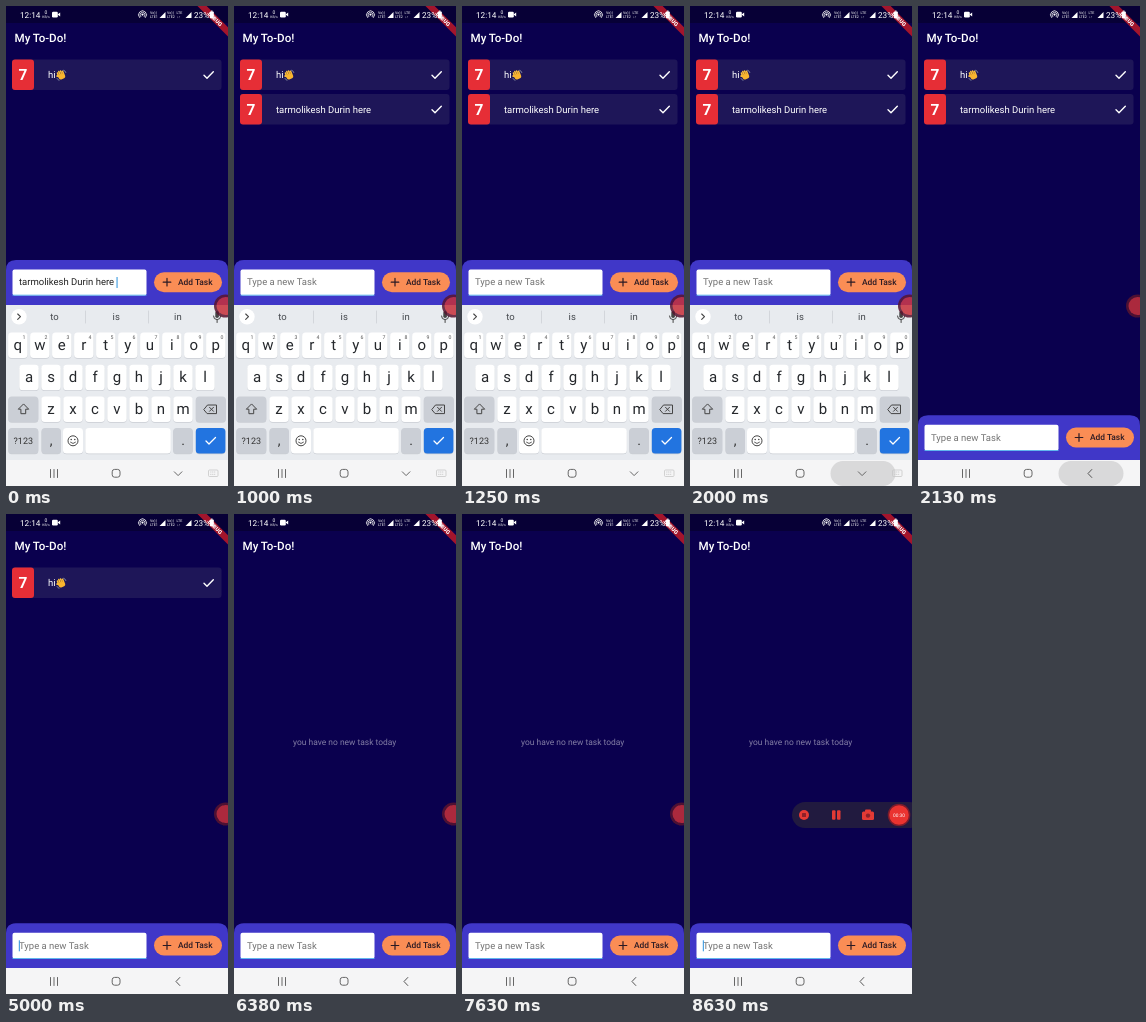
An HTML page for the animation above (8760 ms loop, 222 by 480 pixels).

```html
<!DOCTYPE html>
<html lang="en">
<head>
<meta charset="utf-8">
<title>To-do app</title>
<style>
html, body { margin: 0; width: 100%; height: 100%; overflow: hidden; background: #0a004e; }
svg { display: block; width: 222px; height: 480px; font-family: Roboto, sans-serif; text-rendering: geometricPrecision; }
.line { fill: none; stroke-linecap: round; stroke-linejoin: round; }
.mid { text-anchor: middle; }
</style>
</head>
<body>
<svg id="stage" viewBox="0 0 222 480"></svg>
<script>
const LOOP = 8760, STEP = 125;
const NEW_TASK = 'tarmolikesh Durin here';

const rect = (x, y, w, h, fill, r = 0, extra = '') =>
  `<rect x="${x}" y="${y}" width="${w}" height="${h}" rx="${r}" fill="${fill}" ${extra}/>`;
const circle = (x, y, r, fill, extra = '') =>
  `<circle cx="${x}" cy="${y}" r="${r}" fill="${fill}" ${extra}/>`;
const text = (x, y, size, fill, str, extra = '') =>
  `<text x="${x}" y="${y}" font-size="${size}" fill="${fill}" ${extra}>${str}</text>`;
const line = (d, color, width = 1, extra = '') =>
  `<path class="line" d="${d}" stroke="${color}" stroke-width="${width}" ${extra}/>`;
const group = (id, body, extra = '') => `<g id="${id}" ${extra}>${body}</g>`;
const MID = 'class="mid"', BOLD = 'font-weight="500"';

const wave = `<g transform="translate(55.3 69) rotate(-22)">
  ${line('M-2.8 -.5V-3.2M-1 -1V-4.2M.8 -1V-4M2.5 0V-3M-2.5 1L-4.4 -.6', '#ffc33c', 1.6)}
  ${rect(-3.5, -1.5, 6.8, 5.7, '#f9b52f', 2.5)}
  ${line('M-1.9 -1V-2.4M0 -1.2V-3M1.7 -1V-2.4', '#b8741c', .4)}</g>
  ${line('M57.5 64.2q2 .4 2.4 2.4M51 72.5q.6 1.4 2 1.8', '#9aa5b5', .7)}`;

const task = (id, y, label, extra = '') => group(id,
  rect(6, 53.5, 209.5, 30.5, '#1e1658', 3) + rect(6, 53.5, 22, 30.5, '#e62e36', 3) +
  text(17, 74.4, 15.5, '#fff', '7', MID + ' font-weight="700"') +
  text(42, 72.2, 9.5, '#fff', label) + extra +
  circle(202.5, 69, 0, '#fff', `id="${id}Tap" opacity=".2"`) +
  line('M198 69.2l3 3 6.3-6.4', '#fff', 1.4, 'stroke-linecap="butt"'),
  `transform="translate(0 ${y})"`);

const signal = x => `<path d="M${x} 12h6v-6z" fill="#fff"/>`;
const statusBar = rect(0, 0, 222, 17, '#070036') +
  `<g transform="translate(222 0) rotate(45)">${rect(-22, 15.1, 44, 6.5, '#a3152c')}
   ${text(0, 20.3, 5.5, '#fff', 'DEBUG', MID + ' font-weight="900"')}</g>` +
  text(14, 11.8, 8.2, '#fff', '12:14') +
  text(40, 8.4, 5, '#fff', '0', MID) + text(40, 12, 3.4, '#fff', 'KB/s', MID) +
  rect(46, 5.8, 5.8, 5.6, '#fff', 1.2) + '<path d="M51.5 8.5l2.7-2v4z" fill="#fff"/>' +
  circle(136.5, 8.6, 1.1, '#fff') +
  line('M134.7 10.6a2.5 2.5 0 1 1 3.6 0M133.6 11.6a4 4 0 1 1 5.8 0', '#fff', .8) +
  ['LTE1', 'LTE2'].map((s, i) => text(144 + 17 * i, 8, 3.7, '#fff', 'Vo))') +
    text(144 + 17 * i, 11.8, 3.7, '#fff', s)).join('') +
  signal(153.5) + text(170.5, 8, 3.7, '#fff', 'LTE') + text(171, 11.8, 3.7, '#fff', '↓↑') + signal(179.5) +
  text(188, 11.8, 8.2, '#fff', '23%') + rect(203.8, 5.5, 4, 6.8, '#fff', .8) + rect(205, 4.6, 1.6, 1, '#fff');

const panel = group('panel',
  '<path d="M0 45V10Q0 0 10 0H212Q222 0 222 10V45z" fill="#4037c8"/>' +
  rect(6.5, 9.5, 134, 26, '#fff', 2) + rect(6.5, 34.7, 134, .9, '#55b4ef') +
  text(13, 25.4, 9.5, '#222', NEW_TASK, 'id="typed"') +
  text(13, 25.4, 9.5, '#747474', 'Type a new Task', 'id="hint"') +
  rect(0, 17, 1.1, 11, '#3d9be0', 0, 'id="cursor"') +
  rect(148, 12.2, 68, 20, '#fa8d55', 10) +
  `<clipPath id="pill">${rect(148, 12.2, 68, 20, '#000', 10)}</clipPath>` +
  circle(182, 22.2, 0, '#fff', 'id="addTap" clip-path="url(#pill)"') +
  line('M157.2 22.2h7.6M161 18.4v7.6', '#2a1a24', 1.2) +
  text(172, 25.2, 8.4, '#2a1a24', 'Add Task', BOLD));

const key = (x, y, w, fill, label = '', color = '#25282c', size = 15) =>
  rect(x, y + .8, w, 25.5, '#c9cdd3', 3.5) + rect(x, y, w, 25.5, fill, 3.5) +
  text(x + w / 2, y + 12.5 + size * .34, size, color, label, MID);
const letters = (str, x, y) =>
  [...str].map((c, i) => key(x + 22 * i - 9.7, y, 19.4, '#fff', c)).join('');
const GREY = '#cbcfd6';
const keyboard = group('keyboard',
  rect(0, 299, 222, 155, '#e8ebef') + circle(13, 310.7, 7.7, '#fff') +
  line('M11.7 308l2.8 2.7-2.8 2.7', '#444', 1.1) +
  ['to', 'is', 'in'].map((s, i) => text(48.5 + 61.7 * i, 314, 9.5, '#44484d', s, MID)).join('') +
  line('M79.500 305v12M142.500 305v12', '#cdd1d6', .8) +
  rect(209.3, 305, 3.6, 7, '#444', 1.8) + line('M207.500 310a3.600 3.600 0 0 0 7.200 0M211.100 314v2.500', '#444', 1) +
  letters('qwertyuiop', 11.8, 326.5) +
  [...'1234567890'].map((c, i) => text(18 + 22 * i, 332.7, 5.2, '#555', c, MID)).join('') +
  letters('asdfghjkl', 23, 358.7) + letters('zxcvbnm', 45, 390.5) +
  key(2.3, 390.5, 30, GREY) + line('M17.300 398.200l-5 5h2.600v4.500h4.800v-4.500h2.600z', '#444', 1) +
  key(189.8, 390.5, 30, GREY) + line('M198 403.300l3.500-4.300h9v8.600h-9zM203.500 401.300l4 4m0-4l-4 4', '#444', 1) +
  key(2.3, 422, 30, GREY, '?123', '#333', 9) + key(35.5, 422, 19.4, GREY, ',', '#333', 14) +
  key(57, 422, 20, '#fff') + circle(67, 434.8, 5, 'none', 'stroke="#444"') +
  circle(65.2, 433.5, .8, '#444') + circle(68.8, 433.5, .8, '#444') + line('M64.500 436.300q2.500 2.600 5 0', '#444', .9) +
  key(79.3, 422, 85.5, '#fff') + key(167.2, 422, 19.6, GREY, '.', '#333', 14) +
  key(189.8, 422, 29.6, '#2274e0') + line('M200 435l3 3 6.500-6.500', '#fff', 1.3));

const navBar = rect(0, 454, 222, 26, '#f5f5f6') +
  rect(140.5, 455, 65, 25, '#d9d9da', 12.5, 'id="navTap"') +
  line('M44.500 463.500v8M48 463.500v8M51.500 463.500v8', '#666', 1) +
  rect(106.2, 463.4, 7.8, 7.8, 'none', 2.4, 'stroke="#666"') +
  line('M173.800 463.500l-3.800 4 3.800 4', '#555', 1, 'id="back"') +
  group('closeKeys', line('M168.300 465.800l3.800 3.800 3.800-3.800', '#666') +
    rect(202.5, 464, 9.5, 6.5, 'none', 1, 'stroke="#c8c8c8" stroke-width=".8"') +
    line('M204.500 466h5.500M204.500 468.300h5.500', '#c8c8c8', .8, 'stroke-dasharray=".6 1.300"'));

const RED = '#e33a35';
const recorder = rect(102, 288, 130, 26, '#211a3f', 13, 'id="menu"') +
  group('tools',
    circle(114, 301, 5, RED) + rect(112, 299, 4, 4, '#8d2029', .5) +
    rect(142, 296.3, 3.5, 9.5, RED, 1) + rect(147, 296.3, 3.5, 9.5, RED, 1) +
    rect(172, 297.5, 12, 8.5, RED, 1.5) + rect(175, 295.5, 6, 3, RED, 1) + circle(178, 301.6, 2.2, '#8d2029')) +
  group('bubble', circle(0, 300, 11.5, '#58142f') + circle(0, 300, 9, '#c8313b')) +
  group('timer', circle(209, 301, 11.3, '#7a1c2c') + circle(209, 301, 9.8, '#ea3330') +
    text(209, 302.8, 4.8, '#fff', '00:30', MID));

document.getElementById('stage').innerHTML = rect(0, 0, 222, 480, '#0a004e') +
  statusBar + text(8.5, 36, 11.6, '#fff', 'My To-Do!', BOLD) +
  task('first', 0, 'hi', wave) + task('second', 34.5, NEW_TASK) +
  text(110.7, 231, 8.45, '#837da5', 'you have no new task today', MID + ' id="empty"') +
  panel + keyboard + navBar + recorder;

const el = id => document.getElementById(id);
const set = (id, name, value) => el(id).setAttribute(name, value);
const show = (id, on) => set(id, 'visibility', on ? 'visible' : 'hidden');
const progress = (t, from, to) => Math.min(1, Math.max(0, (t - from) / (to - from)));

const ADDED = 500, KEYS_DOWN = 2125, SECOND_DONE = 4250, FIRST_DONE = 5750;
const CURSOR_ON = [[0, 1000], [1500, 2000], [2500, 2875], [3000, 3500], [4000, 4500],
  [5000, 5500], [6000, 6375], [6875, 7500], [8125, LOOP]];

function draw(now) {
  const t = Math.floor((now % LOOP + 5) / STEP) * STEP;
  const keysOpen = t < KEYS_DOWN, typed = t < ADDED;

  show('first', t < FIRST_DONE);
  show('second', t >= ADDED && t < SECOND_DONE);
  show('empty', t >= FIRST_DONE);
  set('firstTap', 'r', 13 * progress(t, 5250, 5625));
  set('secondTap', 'r', 13 * progress(t, 3750, 4125));

  set('panel', 'transform', `translate(0 ${keysOpen ? 254 : 409.3})`);
  show('typed', typed);
  show('hint', !typed);
  show('cursor', CURSOR_ON.some(([on, off]) => t >= on && t < off));
  set('cursor', 'x', typed ? 110.5 : 12.8);
  set('addTap', 'r', 36 * progress(t, 0, 500));
  set('addTap', 'opacity', .25 * (1 - progress(t, 500, 1000)));

  show('keyboard', keysOpen);
  show('closeKeys', keysOpen);
  show('back', !keysOpen);
  set('navTap', 'opacity', t < 1875 ? 0 : 1 - progress(t, 2125, 2625));

  const open = progress(t, 8250, 8625);
  set('menu', 'x', 222 - 120 * open);
  show('menu', open);
  show('tools', open === 1);
  show('timer', open);
  show('bubble', !open);
  set('bubble', 'transform', `translate(${219.5 - 10.5 * progress(t, 8000, 8250)} 0)`);
  set('bubble', 'opacity', .85);
}

const start = performance.now();
(function tick() {
  draw(performance.now() - start);
  requestAnimationFrame(tick);
})();
</script>
</body>
</html>
```
